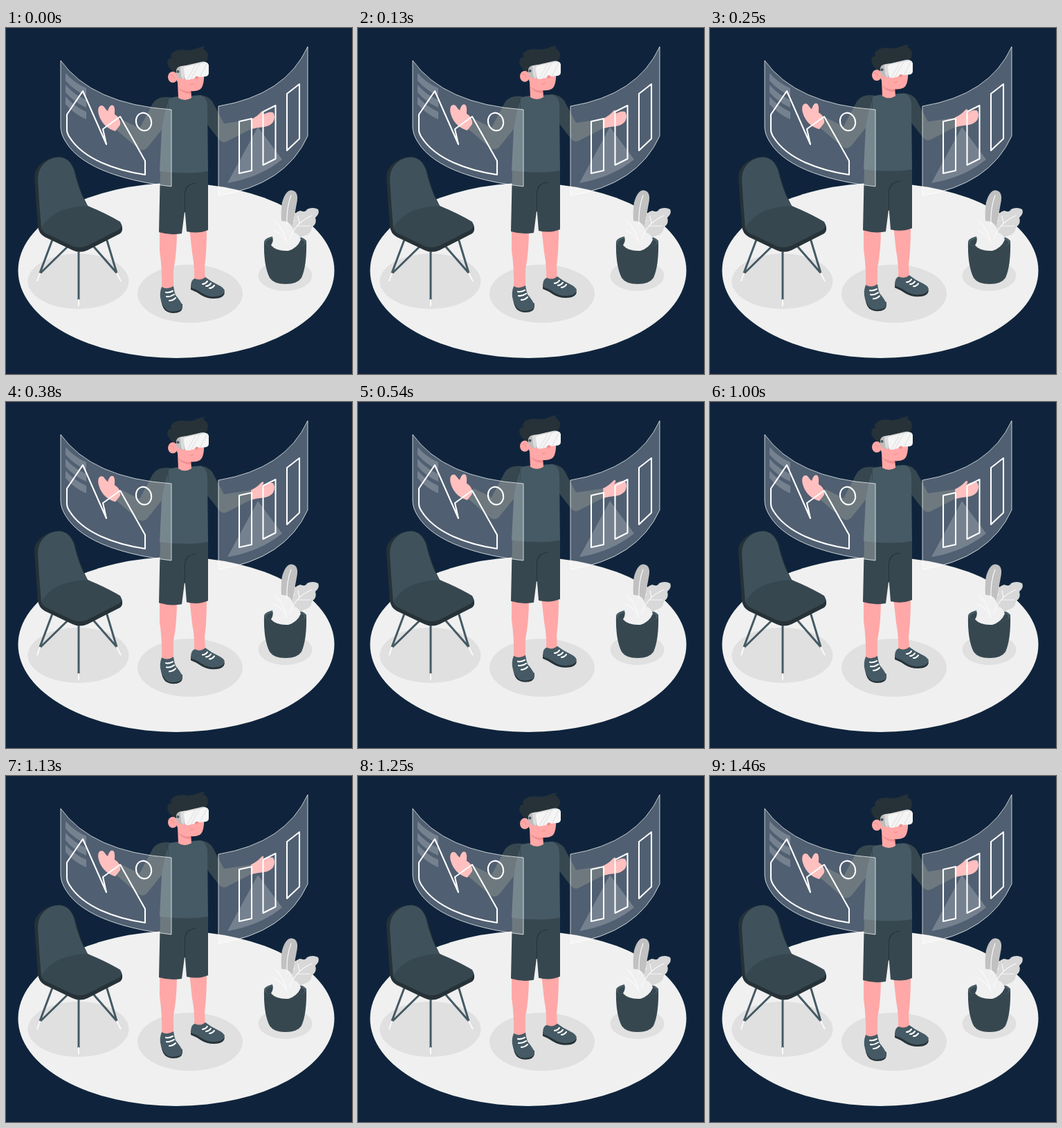
These frames come from a looping animation (500x500 px, 1500 ms). An HTML page:

```html
<!DOCTYPE html>
<html lang="en">
<head>
<meta charset="utf-8">
<title>VR workspace</title>
<style>
html, body { margin: 0; width: 100%; height: 100%; overflow: hidden; background: #0f243c; }
svg { display: block; width: 100vw; height: 100vh; }
.skin { fill: #ffa8a7; }
.blush { fill: #f28f8f; }
.ink { fill: #263238; }
.dark { fill: #37474f; }
.slate { fill: #455a64; }
.line { fill: none; stroke: #fff; stroke-width: 2.1; stroke-linejoin: round; stroke-linecap: round; }
.glass { fill: #fff; fill-opacity: .27; stroke: #fff; stroke-opacity: .75; stroke-width: 1; stroke-linejoin: round; }
.haze { fill: #fff; fill-opacity: .21; }
.fold { fill: none; stroke: #263238; stroke-width: 1; stroke-linecap: round; }
.leg { fill: none; stroke: #455a64; stroke-width: 3; }
.tip { fill: none; stroke: #fafafa; stroke-width: 2; }
</style>
</head>
<body>
<svg viewBox="0 0 500 500">
  <defs>
    <path id="band" class="haze" d="M86 65Q98 79 116 87V98Q98 90 86 76Z"/>
    <clipPath id="lens"><path d="M261 55.500L288 50Q292 49.500 293 54L293 65Q293 69 289 70L279 71Q275 67 272 73L263 75Q258 75 258 70L257 60Q257 56 261 55.500Z"/></clipPath>
  </defs>

  <ellipse cx="246" cy="350.500" rx="228.500" ry="126.500" fill="#f0f0f0"/>
  <g fill="#e0e0e0">
    <ellipse cx="104.500" cy="366" rx="73" ry="40"/>
    <ellipse cx="266" cy="384" rx="76" ry="42"/>
    <ellipse cx="403.500" cy="358" rx="39" ry="22"/>
  </g>

  <g id="person">
    <!-- legs and shoes -->
    <path class="skin" d="M222 290L247 292Q247 325 242 350L242 378Q233 384 225 377Q226 350 222 322Z"/>
    <path class="skin" d="M265 289H290Q290 325 287 344L288 365Q280 370 272 366Q273 345 269 325Z"/>
    <path class="ink" d="M224 391Q225 403 230 408Q235 412 242 412Q254 412 255 404V399Z"/>
    <path class="slate" d="M225 374Q221 384 224 394Q228 406 235 409Q242 411 251 408Q256 405 255 401Q252 394 245 386Q243 381 242 373Q233 379 225 374Z"/>
    <path class="ink" d="M267 372V378Q275 381 282 386Q290 391 300 391Q315 391 316 382Z"/>
    <path class="slate" d="M273 362Q267 363 267 375Q276 378 283 383Q292 389 302 388Q315 387 316 380Q315 375 306 371Q297 367 288 360Q281 366 273 362Z"/>
    <path class="line" d="M231 382Q236 383 241 380M232 388Q237 389 243 385M236 394Q241 394 245 390M284 370Q288 370 291 366M289 373Q293 373 296 369M294 376Q298 376 301 372"/>

    <!-- shorts -->
    <path class="dark" d="M223 202H292V292Q278 298 261 294L258.500 262L254 297Q238 300 221 295Z"/>
    <path class="fold" d="M274 224Q260 226 258.500 238V266M264 227Q260 230 259 236"/>

    <!-- arms -->
    <path class="dark" d="M237 100Q219 98 212 109L193 145L167 132L158 146L192 175Q199 179 205 172L225 147Z"/>
    <path class="dark" d="M281 97Q292 98 298 106L315 138L356 132L358 144L319 164Q312 167 307 160L289 137Z"/>

    <!-- hands -->
    <path class="skin" d="M134 125C132 117 134 112 138 112C142 112 143 117 147 120C149 113 152 110 155 112C158 115 157 121 157 125C163 128 166 134 165 140L158 149C150 147 138 140 134 125Z"/>
    <path class="skin" d="M354 132Q363 128 369 121Q373 118 372 123L370 126Q380 120 386 122Q390 128 386 136Q381 142 372 143Q362 144 355 146Z"/>
    <path class="blush" d="M368 128Q374 123 382 123Q377 125 372 130Z" opacity=".5"/>

    <!-- shirt -->
    <path class="slate" d="M236 101L248 99Q258 107 268 98L281 97Q291 101 291 113L292 207Q276 210 258 209.500Q238 209 222 207L225 147Q228 125 234 108Z"/>
    <path class="fold" d="M248 99.500Q258 108 268 98.500" opacity=".45"/>
    <path class="fold" d="M232 104Q236 108 234 119" opacity=".4"/>

    <!-- head -->
    <path class="skin" d="M248 78L249 101Q258 107 268 101L267 86Z"/>
    <path class="blush" d="M249 86Q258 93 267 91V95Q254 95 249 86Z"/>
    <path class="skin" d="M247 55L285 47Q287 62 286 74Q285 86 280 89Q274 92 266 91Q258 91 253 86Q247 80 246 72Z"/>
    <path class="ink" d="M238 60Q231 52 234 46Q236 43 240 44Q235 39 243 34Q250 30 260 32Q269 33 277 29Q285 26 287 27L285 30Q292 34 292 40Q292 46 287 50Q270 51 257 56L249 65L245 66Z"/>
    <ellipse class="skin" cx="241" cy="71" rx="7" ry="8"/>
    <path d="M237 68Q242 67 243 73" fill="none" stroke="#f28f8f"/>
    <path class="blush" d="M273 68H278Q279 72 276 74Q273 74 273 70Z"/>
    <path d="M266 81Q269 83 271 80" fill="none" stroke="#f28f8f" stroke-width="1.200"/>

    <!-- headset -->
    <path d="M246 61Q247 56 253 55L260 54V74L251 73Q245 70 246 61Z" fill="#bdbdbd"/>
    <circle class="slate" cx="248.500" cy="63" r="2"/>
    <path d="M252 56L282 49Q291 47 293 55L258 60L257 74Q253 72 253 68Z" fill="#dcdcdc"/>
    <g clip-path="url(#lens)">
      <path d="M250 45H296V78H250Z" fill="#f5f5f5"/>
      <path d="M262 74L276 50M267 74L281 50M279 73L291 50" stroke="#e6e6e6" stroke-width="1.500"/>
    </g>
  </g>

  <!-- left screen -->
  <path class="glass" d="M79 47Q124 110 239 118V229C180 222 110 205 86 164Q79 153 79 142Z"/>
  <use href="#band"/><use href="#band" y="17"/><use href="#band" y="34"/>
  <path class="line" d="M88 125L111 91L145 168L140 146L165 128L201 192V212C160 206 112 190 92 158Q88 152 88 147Z"/>
  <ellipse class="line" cx="199" cy="135.500" rx="11" ry="13" transform="rotate(-15 199 135.500)"/>

  <!-- right screen: its lower corner lies over the pale floor -->
  <path class="glass" d="M307 113Q404 97 436 27V156Q404 227 307 242Z"/>
  <path class="haze" d="M320 224L364 143L399 190Q367 216 320 224Z"/>
  <path class="line" d="M337 135L355 131V206L337 210ZM371.500 121L389.500 112V189L371.500 198ZM406 95L424 81V160L406 177Z"/>

  <!-- chair -->
  <path class="leg" d="M67 306L49 354M90 315L50 354M145 304L160 354M125 314L160 354M105 318V393"/>
  <path class="tip" d="M49 354L45 366M160 354L166 366M105 392V402"/>
  <path class="ink" d="M41 216Q41 200 60 190Q90 178 100 207Q107 237 118 257L167 284Q170 293 165 297L118 321Q107 326 96 321L56 302Q47 297 46 286Z"/>
  <path d="M46 220Q46 199 63 190Q88 179 98 205Q106 239 118 257L82 270L51 290Q48 255 46 220Z" fill="#3f525c"/>
  <path class="dark" d="M51 289Q61 271 82 263Q101 257 118 257Q145 268 165 280Q169 286 164 291L117 315Q106 319 96 315L56 296Q52 293 51 289Z"/>

  <!-- plant -->
  <path class="dark" d="M373 309Q372 343 381 361Q387 370 404 370Q421 370 427 361Q435 343 434 307Z"/>
  <ellipse class="slate" cx="403.500" cy="309" rx="30.500" ry="10"/>
  <ellipse class="dark" cx="403.500" cy="310.500" rx="27.500" ry="8.500"/>
  <path d="M400 304Q396 268 399 252Q404 234 413 234.500Q424 236 420 254Q417 270 411 304Z" fill="#c1c1c1"/>
  <path d="M409 304Q412 285 417 279Q414 267 425 264Q433 267 435 262Q443 258 451 262Q454 268 447 274Q450 283 442 288Q441 298 431 300Q421 304 416 315Z" fill="#d8d8d8"/>
  <path d="M377 269Q389 270 399 279Q412 278 416 295Q424 298 426 306Q421 318 408 322Q391 323 383 314Q388 307 384 299Q375 293 380 284Q374 277 377 269Z" fill="#f0f0f0"/>
  <path d="M406 284Q405 260 412 242M410 306Q417 282 442 271M421 286L439 286M424 282L422 272M389 279Q402 292 406 311M387 292Q398 297 404 307" fill="none" stroke="#fafafa" stroke-width="1.200" stroke-linecap="round"/>
</svg>
<script>
const person = document.getElementById('person');
const LOOP = 1500, STEPS = 36, RISE = 9;

// Gentle ease: halfway between linear and sine.
const ease = u => (u + (1 - Math.cos(Math.PI * u)) / 2) / 2;

function draw(now) {
  const step = Math.floor((now % LOOP) / LOOP * STEPS + 0.1) % STEPS;
  const u = 1 - Math.abs(1 - 2 * step / (STEPS - 1));
  person.setAttribute('transform', `translate(0 ${(-RISE * ease(u)).toFixed(2)})`);
  requestAnimationFrame(draw);
}
draw(performance.now());
</script>
</body>
</html>
```
